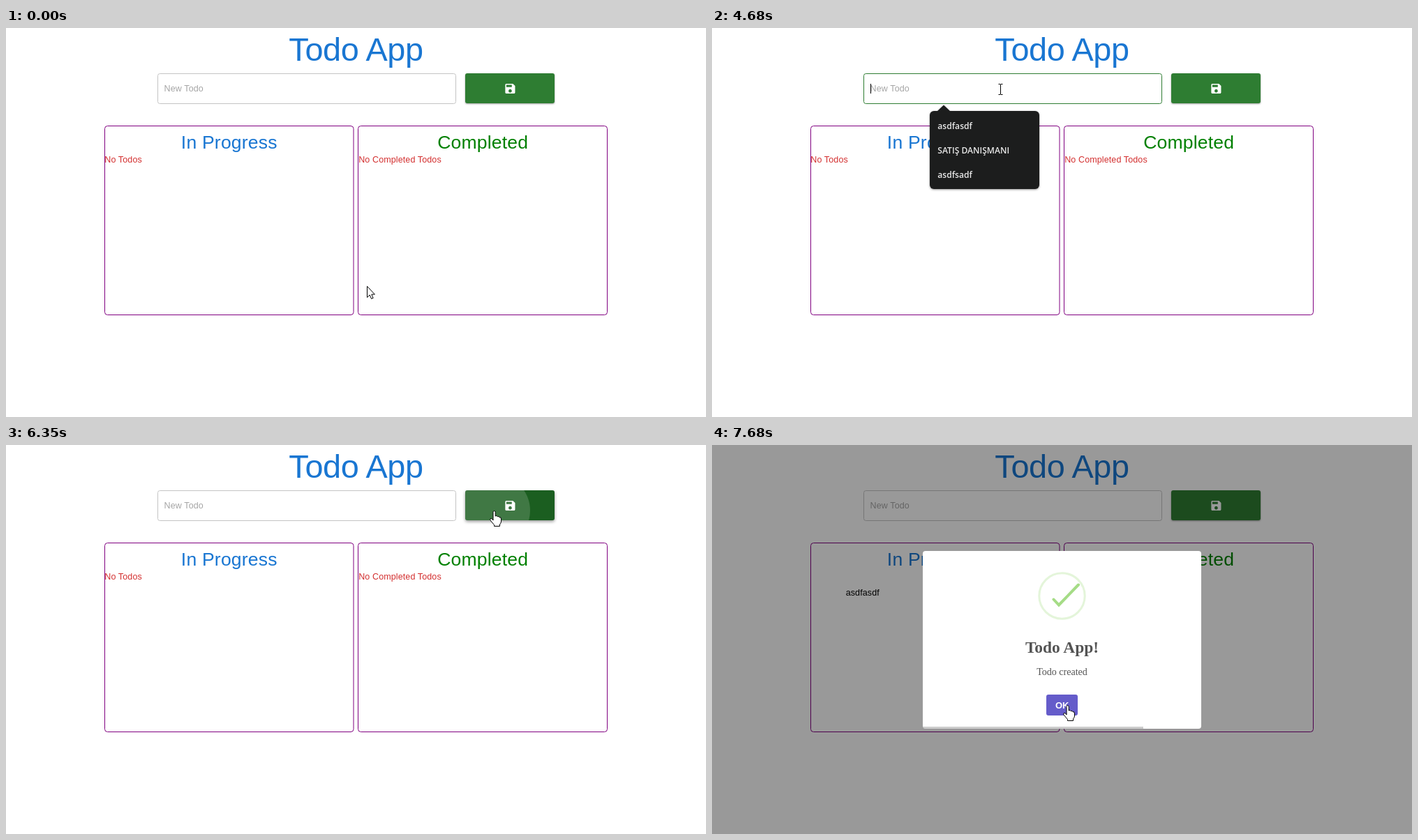
Recreate the animation shown at these times as an HTML page. Size 1003 by 558 pixels, loop 8000 ms.

```html
<!DOCTYPE html>
<html lang="en">
<head>
<meta charset="utf-8">
<title>Todo App</title>
<style>
  html, body { margin: 0; width: 100%; height: 100%; overflow: hidden; background: #fff; }
  html { font-size: 12.5px; }
  svg { display: block; width: 1003px; height: 558px; cursor: default; }
  text { font: 1rem "Liberation Sans", Arial, sans-serif; letter-spacing: .00938em; white-space: pre; }
  .mid { text-anchor: middle; }
  .title { font-size: 3.75rem; letter-spacing: -.00833em; fill: #1976d2; }
  .heading { font-size: 2.125rem; letter-spacing: .00735em; }
  .error { fill: #d32f2f; }
  .panel { fill: none; stroke: purple; }
  .hint { fill: #a5a5a5; }
  .menu text { font: 600 12.1px "Open Sans", "Noto Sans", sans-serif; letter-spacing: 0; fill: #e8e8e8; }
  .menu { filter: drop-shadow(0 1px 1.5px rgba(0, 0, 0, .4)); }
  .save { fill: #2e7d32; filter: drop-shadow(0 1px 1px rgba(0, 0, 0, .38)); }
  .save.hot { fill: #1b5e20; filter: drop-shadow(0 2px 2px rgba(0, 0, 0, .4)); }
  .dialog text { font-family: "Liberation Serif", "Times New Roman", serif; letter-spacing: 0; fill: #545454; }
  .dialog .name { font-size: 1.875rem; font-weight: 700; }
  .dialog .note { font-size: 1.125rem; }
  .dialog .ok { font: 700 13px "Liberation Sans", Arial, sans-serif; fill: #fff; }
  .tick { fill: none; stroke: #a5dc86; stroke-width: 3; }
  .cursor { fill: #fff; stroke: #000; stroke-linejoin: round; }
</style>
</head>
<body>
<svg viewBox="0 0 1003 558">
  <defs>
    <clipPath id="saveClip"><rect x="658" y="65" width="128" height="43" rx="3"/></clipPath>
    <clipPath id="dialogClip"><rect x="302" y="152" width="399" height="255" rx="4"/></clipPath>
  </defs>

  <text class="title mid" x="501.5" y="46.5">Todo App</text>

  <rect id="field" x="217.5" y="65.5" width="427" height="43" rx="3"/>
  <text class="hint" x="226.6" y="91" data-in="idle hover focus press pressed created done">New Todo</text>
  <text x="227" y="91" data-in="preview accepted filled">asdfasdf</text>
  <path d="M227.5 80v14" stroke="#000" data-in="focus preview"/>
  <path d="M275.5 80v14" stroke="#000" data-in="accepted filled"/>

  <rect id="save" class="save" x="658" y="65" width="128" height="43" rx="3"/>
  <g clip-path="url(#saveClip)">
    <circle cx="699" cy="94" r="52" fill="#fff" fill-opacity=".16" data-in="press"/>
    <circle cx="699" cy="94" r="22" fill="#fff" fill-opacity=".02" data-in="pressed"/>
  </g>
  <path transform="translate(713 77.6) scale(.784)" fill="#fff" d="M17 3H5c-1.11 0-2 .9-2 2v14c0 1.1.89 2 2 2h14c1.1 0 2-.9 2-2V7l-4-4zm-5 16c-1.66 0-3-1.34-3-3s1.34-3 3-3 3 1.34 3 3-1.34 3-3 3zm3-10H5V5h10v4z"/>

  <rect class="panel" x="141.5" y="140.5" width="356.5" height="271" rx="4"/>
  <text class="heading mid" x="319.8" y="173" fill="#1976d2">In Progress</text>
  <text class="error" x="141.3" y="193.3" data-in="idle hover focus preview accepted filled press pressed">No Todos</text>
  <text x="191.7" y="215.5" data-in="created done">asdfasdf</text>

  <rect class="panel" x="504.5" y="140.5" width="357" height="271" rx="4"/>
  <text class="heading mid" x="683.2" y="173" fill="green">Completed</text>
  <text class="error" x="505.2" y="193.3">No Completed Todos</text>

  <g id="menu" class="menu" data-in="focus preview accepted">
    <path d="M322 120l10-9.500 10 9.500z" fill="#1c1d1d"/>
    <rect x="312" y="119" width="157" height="112" rx="6" fill="#1c1d1d"/>
    <rect x="312" y="123" width="157" height="34" fill="#393a3a" data-in="preview accepted"/>
    <text x="323.300" y="144.500">asdfasdf</text>
    <text x="323.300" y="179.500">SATIŞ DANIŞMANI</text>
    <text x="323.300" y="214.500">asdfsadf</text>
  </g>

  <g class="dialog" data-in="created done">
    <rect width="1003" height="558" fill-opacity=".4"/>
    <rect x="302" y="152" width="399" height="255" rx="4" fill="#fff"/>
    <circle class="tick" cx="501.5" cy="216.5" r="32.7" stroke-opacity=".3"/>
    <path class="tick" d="M529.600 199.800A32.700 32.700 0 0 1 515.500 246" data-in="created"/>
    <path class="tick" style="stroke-width:4;stroke-linecap:round" d="M489.500 221.500l7.500 8 28-29" data-in="done"/>
    <text class="name mid" x="501.5" y="298">Todo App!</text>
    <text class="note mid" x="501.5" y="330">Todo created</text>
    <rect id="ok" x="479" y="358" width="45" height="30" rx="3"/>
    <text class="ok mid" x="501.700" y="377.500">OK</text>
    <rect id="timer" x="302" y="404" height="3" fill-opacity=".2" clip-path="url(#dialogClip)"/>
  </g>

  <g id="cursor" class="cursor">
    <path data-shape="arrow" d="M.5 .5V16.500L4.200 13 6.600 18.400 9.100 17.300 6.800 12.100H11.400Z"/>
    <path data-shape="hand" d="M5 14V2.500Q5 .5 6.500 .5T8.200 2.500V8Q10.300 6.500 11.300 8.800Q13.300 7.600 14 9.800Q16.500 9 16.500 12V16Q16 18.500 14.500 20V22.500H6.500V20.500Q5 19 .8 13.700Q.3 11 2.700 11.500Q4 12.300 5 14Z"/>
    <path data-shape="beam" fill="none" d="M-3 .5h2.500l.5 .5 .5-.5h2.500M0 1v14M-3 15.500h2.500l.5-.5 .5 .5h2.500"/>
  </g>
</svg>

<script>
  const LOOP = 8000;

  // start time, scene, cursor shape, cursor x, cursor y
  const steps = [
    [0, "idle", "arrow", 517, 370],
    [330, "idle", "arrow", 516, 295],
    [670, "idle", "arrow", 511, 211],
    [1000, "idle", "arrow", 363, 36],
    [1340, "idle", "arrow", 254, -3],
    [2000, "idle", "arrow", 254, -4],
    [2340, "idle", "none", 0, 0],
    [3670, "idle", "arrow", 315, 54],
    [4010, "idle", "arrow", 412, 109],
    [4340, "hover", "beam", 413.5, 80],
    [4680, "focus", "beam", 413.5, 80],
    [5010, "preview", "arrow", 414, 132],
    [5340, "preview", "arrow", 420, 153],
    [5680, "accepted", "arrow", 420, 153],
    [6010, "filled", "hand", 686, 100],
    [6350, "press", "hand", 693, 94],
    [6680, "pressed", "hand", 693, 94],
    [7010, "pressed", "arrow", 699, 93],
    [7350, "created", "arrow", 636, 188],
    [7680, "done", "hand", 503, 373]
  ];

  const byId = id => document.getElementById(id);
  const set = (id, attrs) => {
    for (const key in attrs) byId(id).setAttribute(key, attrs[key]);
  };
  const sceneParts = [...document.querySelectorAll("[data-in]")]
    .map(el => ({ el, scenes: el.dataset.in.split(" ") }));
  const shapes = [...document.querySelectorAll("[data-shape]")];
  const show = (el, visible) => { el.style.display = visible ? "" : "none"; };

  function draw([, scene, shape, x, y]) {
    const is = (...names) => names.includes(scene);
    sceneParts.forEach(({ el, scenes }) => show(el, scenes.includes(scene)));
    shapes.forEach(el => show(el, el.dataset.shape === shape));
    set("cursor", { transform: `translate(${x} ${y})` });
    set("field", {
      fill: is("preview", "accepted", "filled") ? "#e8f0fe" : "#fff",
      stroke: is("focus", "preview", "accepted", "filled") ? "#2e7d32" : is("hover") ? "#212121" : "#c4c4c4"
    });
    set("save", { class: is("press", "pressed") ? "save hot" : "save" });
    set("menu", { opacity: is("accepted") ? .5 : 1 });
    set("ok", { fill: is("done") ? "#655cca" : "#7066e0" });
    set("timer", { width: is("done") ? 316 : 357 });
  }

  let current;
  function tick(now) {
    const time = now % LOOP;
    const step = steps.findLast(([start]) => start <= time) || steps[0];
    if (step !== current) draw(current = step);
    requestAnimationFrame(tick);
  }
  tick(performance.now());
</script>
</body>
</html>
```
